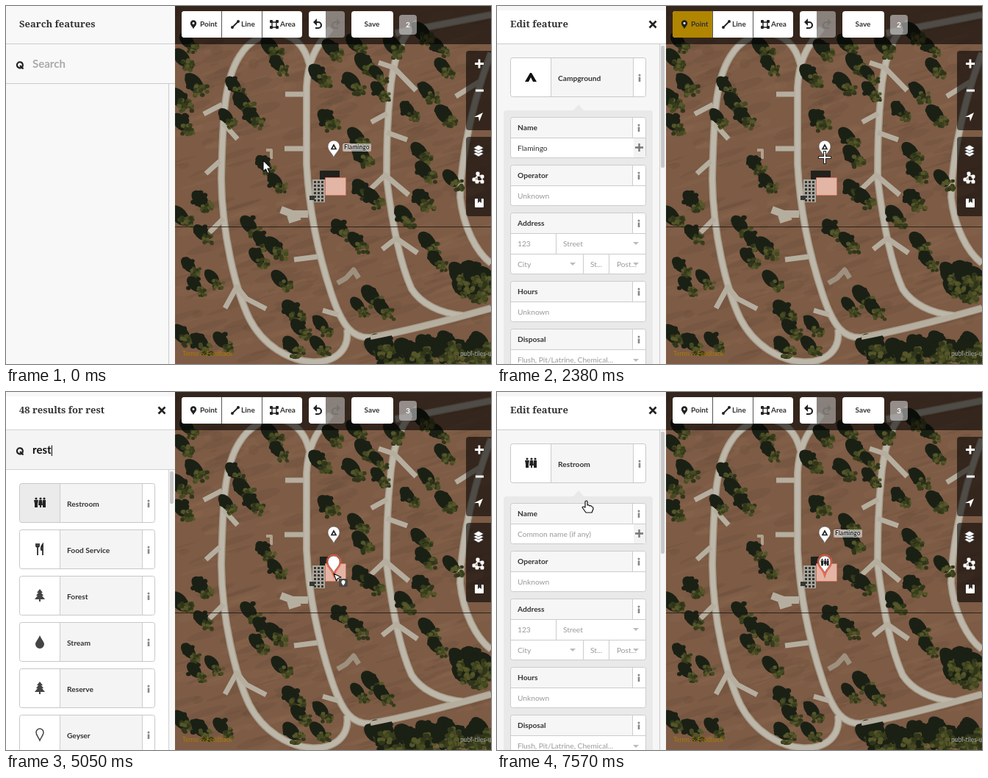
An HTML page with a canvas for the animation above (8000 ms loop, 660 px wide and 487 px high).

```html
<!DOCTYPE html>
<html lang="en">
<head>
<meta charset="utf-8">
<title>Adding a point to a map</title>
<style>
html, body { margin: 0; width: 660px; height: 487px; overflow: hidden; background: #f8f8f8; }
canvas, svg { position: absolute; left: 0; top: 0; }
text { font-family: Lato, "Open Sans", sans-serif; font-weight: 700; white-space: pre; }
text.title { font-family: "Noto Serif", serif; }
</style>
</head>
<body>
<canvas id="map" width="660" height="487"></canvas>
<svg id="ui" width="660" height="487"></svg>
<script>
const LOOP = 8000;

// ---------- aerial map ----------
const ctx = document.getElementById('map').getContext('2d');
let seed = 11;
const rnd = () => (seed = seed * 16807 % 2147483647) / 2147483647;
const spread = r => (rnd() - .5) * 2 * r;

function blob(x, y, rx, ry, color, turn = 0) {
  ctx.fillStyle = color;
  ctx.beginPath();
  ctx.ellipse(x, y, rx, ry, turn, 0, 7);
  ctx.fill();
}

function road(d, width, color = '#b5ae9f') {
  ctx.strokeStyle = color;
  ctx.lineWidth = width;
  ctx.stroke(new Path2D(d));
}

// The sun is low in the south-east: shadows fall up and to the left.
function tree(x, y, size = 1) {
  const r = (9 + rnd() * 3) * size;
  blob(x - 4, y - 5, r * 1.35, r * .85, '#1b2015', .85);
  for (let i = 0; i < 6; i++) blob(x - 5 + spread(r * .8), y - 6 + spread(r * .8), r * .35, r * .3, '#1b2015');
  const tones = ['#383d1c', '#464a22', '#30351a', '#555629'];
  for (let i = 0; i < 20; i++) blob(x + 5 + spread(r * .75), y + 5 + spread(r * .65), r * .27, r * .24, tones[i % 4]);
}

function drawMap() {
  ctx.fillStyle = '#7d5b45';
  ctx.fillRect(230, 0, 430, 487);
  for (let i = 0; i < 420; i++) {
    const tone = i % 2 ? 'rgba(157,115,88,.13)' : 'rgba(70,54,38,.1)';
    blob(230 + rnd() * 430, rnd() * 487, 5 + rnd() * 28, 1 + rnd() * 6, tone, -.3);
  }

  ctx.lineCap = 'butt';
  ctx.lineJoin = 'round';
  const lanes = [
    'M413 80C400 25 345 25 318 68C297 100 295 150 293 235C294 310 312 385 331 425C350 462 385 482 415 484C445 486 468 470 464 440',
    'M442 30C420 58 411 75 409 110V215C413 290 429 350 443 392C458 437 472 452 496 451C540 443 610 425 660 411',
    'M560 22C538 40 530 65 524 105C518 160 518 200 518 235C526 300 536 350 552 385C565 405 590 418 622 421',
    'M530 37L660 12',
    'M660 64C642 110 620 190 618 260C622 300 640 335 660 350'
  ];
  lanes.forEach(d => road(d, 10, '#a69c8a'));
  lanes.forEach(d => road(d, 7, '#bdb7aa'));
  [
    'M269 147L294 134M296 160L315 181M272 228L291 211M380 120H406M379 194H406M277 308L296 289',
    'M298 411L314 382L327 398L354 412M392 345L424 341M431 414L452 420M507 77L528 84L558 115',
    'M497 158L519 146M518 172L546 182M497 248L516 230L548 257M512 331L531 316L560 336M612 123L644 103'
  ].forEach(d => road(d, 7));
  road('M374 277L390 283H411M384 291L400 286', 10);
  road('M451 377L463 370L473 359L480 370', 7, '#9e907e');
  road('M354 196H361V208', 4, '#afa28d');

  const trees = [
    250,52, 243,75, 260,110, 239,130, 363,60, 373,83, 313,112, 325,135, 338,155, 303,155, 242,163,
    428,97, 446,62, 478,55, 491,82, 474,108, 508,96, 510,118, 590,58, 598,87, 576,120, 550,145,
    569,40, 480,182, 487,207, 440,158, 354,219, 370,243, 487,253, 502,264, 566,202, 572,228, 570,267,
    268,268, 269,313, 240,290, 334,302, 350,322, 345,345, 368,332, 376,376, 252,357, 260,383, 284,374,
    242,451, 268,462, 296,459, 392,418, 402,442, 432,437, 428,465, 392,466, 458,307, 480,324, 577,325,
    588,349, 500,398, 482,411, 515,415, 545,289, 600,152, 609,239, 530,58
  ];
  for (let i = 0; i < trees.length; i += 2) tree(trees[i], trees[i + 1]);
  for (let i = 0; i < 28; i++) tree(500 + rnd() * 160, 459 + rnd() * 30, 1.15);
  for (let i = 0; i < 12; i++) tree(612 + rnd() * 48, 357 + rnd() * 40, 1.1);
  road('M496 451C540 443 610 425 660 411', 6, '#b5ae9f');

  // Building with its shadow and the parking pad beside it.
  ctx.fillStyle = '#20221b';
  ctx.fillRect(427, 224, 27, 14);
  ctx.fillStyle = '#aaa69d';
  ctx.fillRect(417, 236, 17, 31);
  ctx.fillStyle = '#373832';
  for (let i = 0; i < 18; i++) ctx.fillRect(419 + i % 3 * 5, 238 + (i / 3 | 0) * 5, 3, 3);
  ctx.fillRect(413, 258, 7, 6);
  ctx.fillStyle = '#e3b5a5';
  ctx.fillRect(435, 234, 27, 23);
  ctx.strokeStyle = '#cb715d';
  ctx.lineWidth = 1;
  ctx.strokeRect(434.5, 233.5, 28, 24);

  ctx.fillStyle = 'rgba(25,22,17,.8)';
  ctx.fillRect(230, 300, 430, 1);
}

// ---------- vector helpers ----------
const rect = (x, y, w, h, fill, more = '') => `<rect x="${x}" y="${y}" width="${w}" height="${h}" fill="${fill}" ${more}/>`;
const text = (x, y, s, size = 10.2, fill = '#333', more = '') => `<text x="${x}" y="${y}" font-size="${size}" fill="${fill}" ${more}>${s}</text>`;
const shape = (d, fill = '#333', more = '') => `<path d="${d}" fill="${fill}" ${more}/>`;
const line = (d, color = '#ccc', width = 1, more = '') => shape(d, 'none', `stroke="${color}" stroke-width="${width}" ${more}`);
const at = (x, y, s, scale = 1) => `<g transform="translate(${x} ${y}) scale(${scale})">${s}</g>`;
const title = s => text(18, 29, s, 13, '#333', 'class="title"');
const hint = (x, y, s) => text(x, y, s, 10.2, '#999', 'style="font-weight:400"');
const mid = 'text-anchor="middle"';

const PIN = 'M0 14C-2 8-8 5-8-1A8 8 0 0 1 8-1C8 5 2 8 0 14Z';
const letter = c => text(0, 6, c, 18, '#111', mid);
const person = (x, body) => at(x, 0, '<circle cy="-6" r="1.6" fill="#222"/>' + shape(body, '#222'));
const HOUSE = 'M-7 1L0-4 7 1V7H2V3H-2V7H-7ZM0-5V-9H6V-6H1V-4Z';
const icons = {
  camp: shape('M-8 6L-1-6H1L8 6H3L0 0-3 6Z', '#111'),
  picnic: line('M-5-5H5M-8 0H8M-2-5L-5 6M2-5L5 6', '#222', 1.8),
  parking: letter('P'),
  info: '<circle r="7" fill="none" stroke="#333" stroke-width="1.4"/>' + text(0, 4, '?', 11, '#333', mid),
  visitor: shape(HOUSE, '#111') + line('M0 1V4', '#35a35c', 2),
  ranger: shape(HOUSE, '#111'),
  restroom: person(-5, 'M-3-4H3L2 1V6H-2V1Z') + person(1, 'M-2-4H2L3 3H1V6H-1V3H-3Z') + person(6, 'M-2-4H2V6H-2Z'),
  food: line('M-5-8V-4Q-3-2-1-4V-8M-3-8V8M4 8V-7Q1-3 2 1H4', '#222', 1.7),
  tree: shape('M0-9L4-4H2L5 0H3L7 5H1V8H-1V5H-7L-3 0H-5L-2-4H-4Z', '#444'),
  drop: shape('M0-9C2-4 6 0 6 3A6 6 0 0 1-6 3C-6 0-2-4 0-9Z', '#444'),
  point: line('M0 8C-2 3-5 1-5-3A5 5 0 0 1 5-3C5 1 2 3 0 8Z', '#444', 1.5),
  hospital: letter('H')
};
const infoMark = (x, y) => at(x, y, '<circle cy="-4" r="1.5" fill="#888"/>' + rect(-1.3, -1.5, 2.6, 6.5, '#888'));
const caret = (x, y) => shape(`M${x - 4} ${y - 2}h8l-4 4z`, '#bbb');
const search = line('M16 77.5a4 4 0 1 0 .1-.1M19 81l4.5 4.5', '#222', 2.2);
const close = line('M207.5 20.5l9 9M216.5 20.5l-9 9', '#222', 2.6);

// ---------- sidebar ----------
function card(y, icon, name, iconFill = '#fff', fill = '#f5f5f5') {
  return rect(18.5, y + .5, 184, 53, fill, 'rx="3"') + rect(19, y + 1, 54, 52, iconFill) + rect(186, y + 1, 16, 52, '#fff') +
    line(`M73.5 ${y}v53M185.5 ${y}v53`) + rect(18.5, y + .5, 184, 53, 'none', 'rx="3" stroke="#c8c8c8"') +
    at(46, y + 27, icons[icon]) + text(83, y + 32, name) + infoMark(194, y + 28);
}

const thumb = (y, h) => rect(223, y, 5, h, '#c8c8c8', 'rx="2"');

function featureList() {
  return rect(0, 0, 230, 487, '#f8f8f8') + title('Search features') + search + text(36, 84, 'Search', 15, '#aaa') +
    line('M0 51.5H230M0 105.5H230M221.5 106V487');
}

const presets = [['camp', 'Campground'], ['picnic', 'Picnic Area'], ['parking', 'Parking'], ['info', 'Information'], ['visitor', 'Visitor Center'], ['ranger', 'Ranger Station']];
const broad = [['restroom', 'Restroom'], ['food', 'Food Service'], ['tree', 'Forest'], ['drop', 'Stream'], ['tree', 'Reserve'], ['point', 'Geyser']];
const narrow = [['restroom', 'Restroom'], ['hospital', 'Hospital Grounds'], ['hospital', 'Hospital Building'], ['point', 'Point']];
const counts = [0, 213, 126, 64, 48];

function presetList(query, cursorOn) {
  const n = query.length, few = n > 4;
  const list = few ? narrow : n ? broad : presets;
  const typed = n ? `<text x="36" y="84" font-size="15" fill="#111">${query}${cursorOn ? '<tspan dx="-1" font-weight="400">|</tspan>' : ''}</text>`
    : text(36, 84, 'Search', 15, '#aaa') + line('M36.5 69V88', '#111');
  return rect(0, 0, 230, 487, '#fff') + rect(0, 0, 230, 6, '#f8f8f8') + (n ? rect(0, 52, 230, 53, '#f4f4f4') : '') +
    (few ? rect(0, 386, 221, 101, '#f3f3f3') + line('M0 385.5H221') : '') + rect(222, 106, 8, 381, '#f8f8f8') +
    title(n ? `${few ? 4 : counts[n]} results for ${query}` : 'Select feature type') + close + search + typed +
    line('M0 51.5H230M0 105.5H230M221.5 106V487', '#d2d2d2') + (few ? '' : n ? thumb(108, 44) : thumb(108, 182)) +
    list.map(([icon, name], i) => {
      const point = name === 'Point';
      return card(124 + 63 * i, icon, name, point ? '#e6e9ff' : n && !i ? '#ebebeb' : '#fff', point ? '#e6e9ff' : '#f4f4f4');
    }).join('');
}

function field(y, name, rows = 1) {
  const h = 28 + 28 * rows;
  return rect(18.5, y + .5, 184, h - 1, '#fff', 'rx="3"') + rect(19, y + 1, 166, 27, '#f6f6f6') +
    line(`M18 ${y + 28.5}H203M184.5 ${y}v28`) + rect(18.5, y + .5, 184, h - 1, 'none', 'rx="3" stroke="#ccc"') +
    text(28, y + 18, name) + infoMark(193, y + 15);
}

function editor(icon, kind, name) {
  return rect(0, 0, 230, 487, '#f6f6f6') + rect(0, 6, 230, 45, '#fff') + title('Edit feature') + close +
    line('M0 51.5H230M221.5 52V487') + thumb(54, 166) + card(70, icon, kind) +
    shape('M103 143l8-9 8 9z', '#e9e9e9') + rect(9, 142, 203, 360, '#e9e9e9', 'rx="4"') +
    field(151, 'Name') + (name ? text(28, 197, name, 10.2, '#333', 'style="font-weight:400"') : hint(28, 197, 'Common name (if any)')) +
    rect(186, 180, 16, 26, '#f3f3f3') + line('M193.5 187v11M188 192.5h11', '#777', 2.4) +
    field(216, 'Operator') + hint(28, 262, 'Unknown') +
    field(281, 'Address', 2) + line('M19 337.5H203M80.5 310V337M117.5 338V364M152.5 338V364') +
    hint(28, 327, '123') + hint(90, 327, 'Street') + hint(28, 355, 'City') + hint(127, 355, 'St...') + hint(163, 355, 'Post...') +
    caret(189, 323) + caret(103, 351) + caret(189, 351) +
    field(374, 'Hours') + hint(28, 420, 'Unknown') +
    field(439, 'Disposal') + hint(28, 485, 'Flush, Pit/Latrine, Chemical...') + caret(189, 482);
}

// ---------- toolbar and map controls ----------
function toolbar(pointFill, count) {
  const undo = (x, flip, color) => `<g transform="translate(${x} 25) scale(${flip} 1)">` +
    line('M-2-3H1A4 4 0 0 1 1 5H-3', color, 2.2) + shape('M-6-3L-1-8V2Z', color) + '</g>';
  const node = (x, y) => rect(x - 2, y - 2, 4, 4, '#222', 'rx="1"');
  return rect(230, 0, 430, 52, 'rgba(0,0,0,.58)') + rect(239, 7, 164, 36, '#fff', 'rx="4"') +
    shape('M243 7h50v36h-50q-4 0-4-4v-28q0-4 4-4z', pointFill) + line('M293.5 7V43M348.5 7V43', '#555') +
    at(255, 24, shape(PIN, '#222') + '<circle cy="-1" r="2.8" fill="#fff"/>', .52) + text(264, 28, 'Point', 10) +
    line('M309 28L316 21', '#222', 1.8) + '<circle cx="308" cy="29" r="2" fill="#222"/><circle cx="316" cy="21" r="2" fill="#222"/>' + text(320, 28, 'Line', 10) +
    line('M362 22H368V29H362Z', '#222', 1.4) + [[361, 21], [369, 21], [361, 29], [369, 29]].map(p => node(...p)).join('') + text(373, 28, 'Area', 10) +
    shape('M416 7h19v36h-19q-4 0-4-4v-28q0-4 4-4z', '#fff') + shape('M435 7h22q4 0 4 4v28q0 4-4 4h-22z', 'rgba(255,255,255,.42)') +
    undo(424, 1, '#222') + undo(449, -1, '#77736e') +
    rect(470, 7, 57, 36, '#fff', 'rx="4"') + text(498, 28, 'Save', 10, '#333', mid) +
    rect(535, 12, 24, 27, 'rgba(255,255,255,.48)', 'rx="4"') + text(547, 29, count, 10, '#fff', mid);
}

const controls = (() => {
  const panel = y => shape(`M660 ${y}h-30q-4 0-4 4v100q0 4 4 4h30z`, 'rgba(0,0,0,.58)');
  const layer = y => shape(`M636 ${y}l7-4 7 4-7 4z`, '#fff', 'stroke="#333" stroke-width=".8"');
  const dot = (x, y) => rect(x - 2.5, y - 2.5, 5, 5, '#fff', 'rx="1.5"');
  return panel(61) + panel(178) + line('M638 78.5H650M644 72.5V84.5M639 115H650', '#fff', 2.8) +
    shape('M637 151L649 145 644 157 643 151Z', '#fff') + layer(201) + layer(197) + layer(193) +
    line('M637 236L644 228M641 231V238H648V231H642', '#fff', 1.4) +
    [[637, 236], [642, 228], [648, 232], [648, 239], [641, 239]].map(p => dot(...p)).join('') +
    rect(638, 262, 12, 12, '#fff', 'rx="1"') + shape('M642 262h5v6l-2.5-2-2.5 2z', '#333') +
    text(240, 476, 'Terms &amp; Feedback', 8.5, '#a87b08', 'style="font-weight:400"') +
    text(618, 476, 'publ-tiles-u', 8.5, '#aaa', 'style="font-weight:400"');
})();

function markers(labelOn, count, tagged) {
  const camp = at(446, 192, shape(PIN, '#fff', 'stroke="#555" stroke-width=".6"') + at(0, 0, line('M-3 2.5L0-3 3 2.5Z', '#222', 1.6)));
  const label = rect(458, 187, 39, 11, 'rgba(255,255,255,.5)', 'rx="2"') +
    text(460, 195, 'Flamingo', 8.5, '#222', 'stroke="#fff" stroke-opacity=".6" stroke-width="1.5" paint-order="stroke"');
  const added = at(446, 232, shape(PIN, '#fff', 'stroke="#e9563f" stroke-opacity=".8" stroke-width="5" paint-order="stroke"') +
    line(PIN, '#555', .6) + (tagged ? at(0, 0, icons.restroom, .7) : ''));
  return (labelOn ? label : '') + camp + (count > 2 ? added : '');
}

// ---------- pointer ----------
const ink = 'stroke="#111" stroke-width="1.2" stroke-linejoin="round"';
const pointers = {
  arrow: shape('M0 0V15L3.5 12 6 17.5 8.5 16.5 6 11H11Z', '#fff', ink),
  cross: line('M0-9V9M-9 0H9', '#222', 4) + line('M0-8V8M-8 0H8', '#fff', 1.8),
  pick: shape('M0 0L3.5 10 5.5 6.5 10 5Z', '#fff', ink) + rect(7, 7, 12, 11, '#4a4a46', 'rx="1"') + at(13, 12, shape(PIN, '#fff'), .32),
  grab: shape('M-4 8L-8 1Q-7-1-5 1L-3 3-5-5Q-3-7-2-5L-1-1V-7Q1-9 2-7V-1L3-6Q5-7 5-5V0L6-3Q8-4 8-2L6 5 5 8Z', '#fff', ink),
  hand: shape('M-2 8L-7 1Q-6-1-3 1V-7Q-1-9 0-7V-2Q2-3 3-1 5-2 6 0 8 0 8 3L6 8Z', '#fff', ink)
};

// Each entry holds until the next: start time, x, y, pointer.
const path = [
  [0, 350, 210, 'arrow'], [150, 338, 170, 'arrow'], [300, 313, 108, 'arrow'], [445, 290, 58, 'arrow'], [590, 274, 35, 'hand'],
  [740, 269, 32, 'hand'], [1490, 300, 72, 'cross'], [1640, 421, 259, 'cross'], [1790, 432, 290, 'cross'],
  [2080, 434, 268, 'cross'], [2230, 440, 234, 'cross'], [2375, 446, 206, 'cross'], [2520, 446, 197, 'cross'],
  [2670, 446, 214, 'cross'], [2810, 446, 236, 'cross'], [2960, 446, 246, 'cross'], [3710, 446, 247, 'pick'],
  [6090, 386, 240, 'grab'], [6240, 300, 213, 'grab'], [6390, 205, 183, 'hand'], [6540, 150, 165, 'hand'],
  [6690, 129, 158, 'hand'], [6840, 123, 156, 'hand']
];
const keystrokes = [[4610, 1], [4760, 2], [4910, 3], [5050, 4], [5200, 5], [5350, 7], [5490, 8]];
const latest = (steps, t) => steps.filter(s => s[0] <= t).pop();

function sidebar(t) {
  if (t < 3860) return t >= 2375 && t < 2810 ? editor('camp', 'Campground', 'Flamingo') : featureList();
  if (t >= 7280) return editor('restroom', 'Restroom');
  const typed = latest(keystrokes, t);
  const list = presetList('restroom'.slice(0, typed ? typed[1] : 0), t < 5490);
  return t < 7130 ? list : at(-105, 0, list) + at(125, 0, editor('restroom', 'Restroom'));
}

function scene(t) {
  const [, x, y, kind] = latest(path, t);
  const count = t < 3710 ? 2 : 3;
  const pointFill = t >= 1490 && t < 3710 ? '#b08500' : t >= 590 && t < 1490 ? '#ececec' : '#fff';
  return markers(t < 2230 || t >= 6390, count, t >= 7280) + toolbar(pointFill, count) + controls +
    `<svg width="230" height="487">${sidebar(t)}</svg>` + at(x, y, pointers[kind]);
}

const ui = document.getElementById('ui');
const start = performance.now();
let shown = '';
function frame() {
  const next = scene((performance.now() - start) % LOOP);
  if (next !== shown) ui.innerHTML = shown = next;
  requestAnimationFrame(frame);
}
drawMap();
frame();
</script>
</body>
</html>
```
